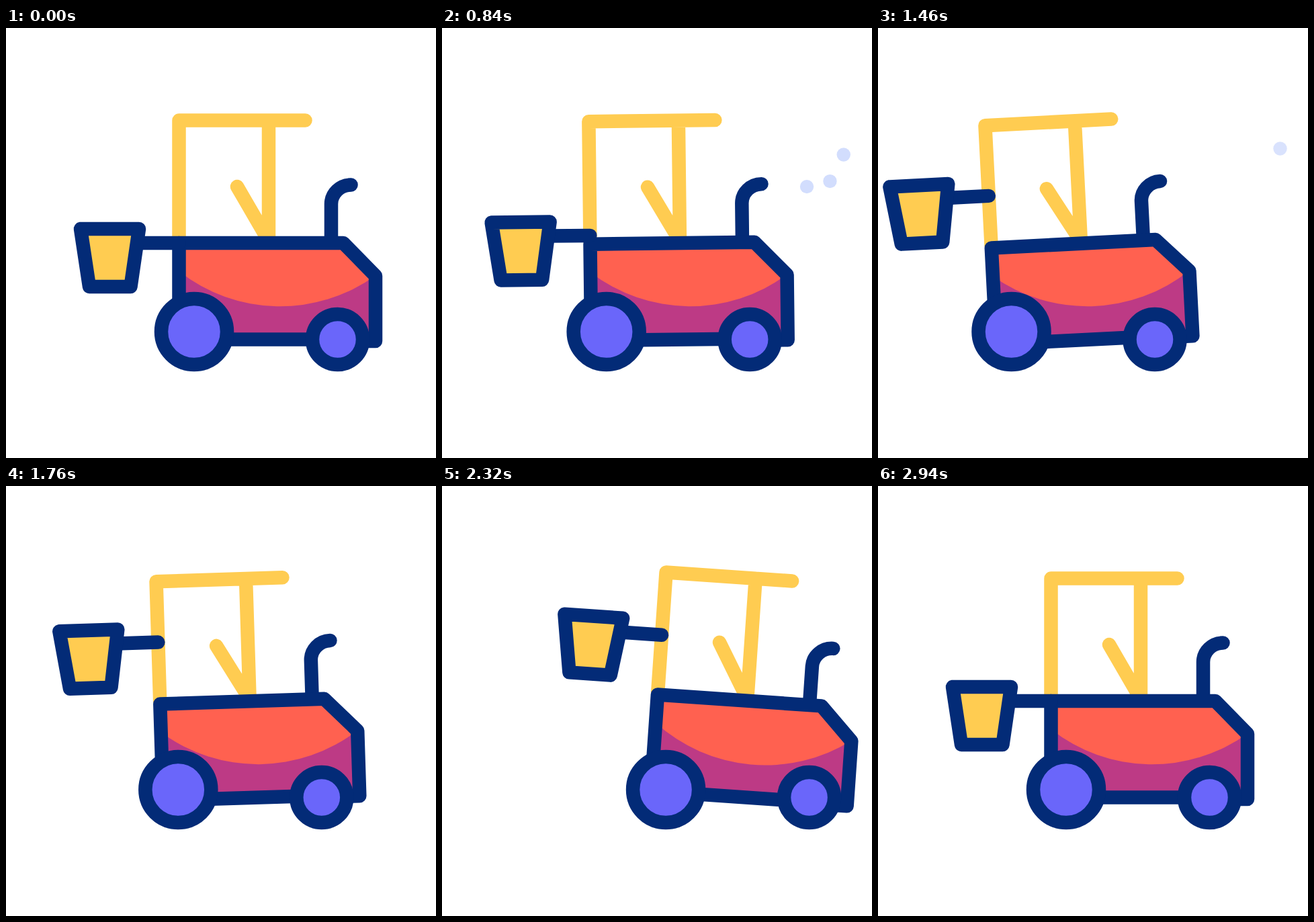
Animation of 640x640 px, one loop 3.6 s. Source, as an HTML page:

```html
<!DOCTYPE html>
<html>
<head>
<meta charset="utf-8">
<style>
  html, body { margin: 0; width: 100%; height: 100%; overflow: hidden; background: #fff; }
  svg { display: block; width: 100%; height: 100%; }
  .line { fill: none; stroke-width: 20.5; stroke-linecap: round; stroke-linejoin: round; }
  .navy { stroke: #032b77; }
  .gold { stroke: #ffcc51; }
</style>
</head>
<body>
<svg viewBox="0 0 640 640">
  <g id="smoke" fill="#d2ddfd">
    <circle r="10.2"/><circle r="10.2"/><circle r="10.2"/>
  </g>
  <g id="tractor">
    <g id="body">
      <path class="line gold" d="M257.5 316V137.5H445.5M391 137.5V316M344 236L390.5 316"/>
      <path class="line navy" d="M484 318V262A29.5 28.5 0 0 1 513.5 233.5"/>
      <path fill="#bd3a85" d="M257.5 320H502L550 369V464H257.5Z"/>
      <path fill="#ff6150" d="M257.5 320H502L550 368.5A243 243 0 0 1 257.5 362Z"/>
      <path class="line navy" d="M257.5 430V320H502L550 369V466H515M290 463.5H490"/>
      <g id="bucket">
        <path class="line navy" d="M196 320H257.5"/>
        <path class="line navy" style="fill:#ffcc51" d="M111 299H198L185.5 385H124Z"/>
      </g>
    </g>
    <g class="line navy" style="fill:#6a66fa">
      <circle cx="280" cy="452" r="49"/>
      <circle cx="493.5" cy="463.5" r="37.5"/>
    </g>
  </g>
</svg>
<script>
const LOOP = 3600, PUFF_LIFE = 1000, PUFF_GAP = 290;
const [tractor, body, bucket, smoke] =
  ['tractor', 'body', 'bucket', 'smoke'].map(id => document.getElementById(id));

const cubic = (u, a, b, c, d) => {
  const v = 1 - u;
  return v * v * v * a + 3 * v * v * u * b + 3 * v * u * u * c + u * u * u * d;
};
const clamp = v => Math.min(1, Math.max(0, v));

// Same as the CSS timing function cubic-bezier(a, 0, b, 1)
function ease(p, a = 1 / 3, b = 2 / 3) {
  let lo = 0, hi = 1;
  for (let i = 0; i < 24; i++) {
    const mid = (lo + hi) / 2;
    if (cubic(mid, 0, a, b, 1) < p) lo = mid; else hi = mid;
  }
  return cubic(lo, 0, 0, 1, 1);
}

// Each key: [time, value, a, b]; a and b shape the way to that key
function track(t, keys) {
  if (t <= keys[0][0]) return keys[0][1];
  for (let i = 1; i < keys.length; i++) {
    const [t0, v0] = keys[i - 1], [t1, v1, a, b] = keys[i];
    if (t < t1) return v0 + (v1 - v0) * ease((t - t0) / (t1 - t0), a, b);
  }
  return keys[keys.length - 1][1];
}

const drive = [[0, 0], [1400, -84.5, .645, .75], [2260, 56, .26, .65], [2700, 0]];
const tilt = [[530, 0], [1550, -3], [2355, 4], [2940, 0]];
const lift = [[560, 0], [1760, 92], [2245, 92], [2940, 0]];

function draw(now) {
  const t = now % LOOP;
  tractor.setAttribute('transform', `translate(${track(t, drive)} 0)`);
  body.setAttribute('transform', `rotate(${track(t, tilt)} 400 465)`);
  bucket.setAttribute('transform', `translate(0 ${-track(t, lift)})`);
  [...smoke.children].forEach((puff, i) => {
    const u = clamp((t - i * PUFF_GAP) / PUFF_LIFE);
    puff.setAttribute('cx', cubic(u, 513.5, 545, 610, 597));
    puff.setAttribute('cy', cubic(u, 233.5, 236, 254, 146));
    puff.setAttribute('opacity', clamp((1 - u) / .14));
  });
  requestAnimationFrame(draw);
}
draw(0);
</script>
</body>
</html>
```
